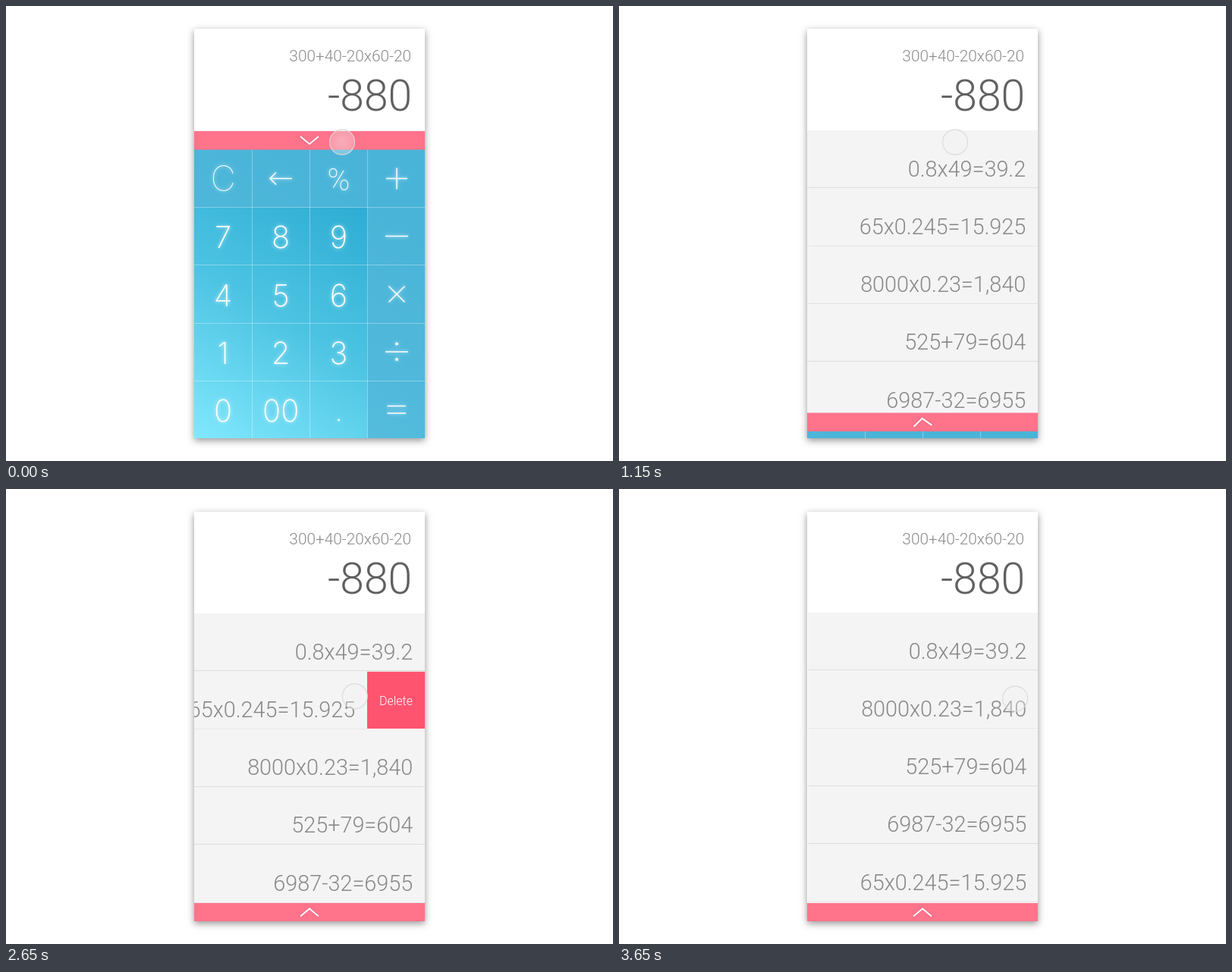
Animation of 800 by 600 pixels, one loop 4150 ms. Source, as an HTML page with a canvas:

```html
<!DOCTYPE html>
<html>
<head>
<meta charset="utf-8">
<style>
html, body { margin: 0; width: 100%; height: 100%; overflow: hidden; background: #fff; }
canvas { display: block; }
</style>
</head>
<body>
<canvas id="stage" width="800" height="600"></canvas>
<script>
const ctx = document.getElementById('stage').getContext('2d');
const LOOP = 4150, STEP = 50;
const LEFT = 248, TOP = 30, W = 304, H = 540, CELL = 76, ROW = 76.3, LIST_TOP = 164;
const ROWS = ['0.8x49=39.2', '65x0.245=15.925', '8000x0.23=1,840', '525+79=604', '6987-32=6955'];
const KEYS = [['7', '8', '9'], ['4', '5', '6'], ['1', '2', '3'], ['0', '00', '']];

const progress = (t, start, duration) => Math.min(1, Math.max(0, (t - start) / duration));
const smooth = u => u * u * (3 - 2 * u);
const mix = (a, b, p) => a + (b - a) * p;

// cubic-bezier(.25, 0, .2, 1)
function ease(u) {
  let lo = 0, hi = 1;
  for (let i = 0; i < 24; i++) {
    const s = (lo + hi) / 2, r = 1 - s;
    if (.75 * r * r * s + .6 * r * s * s + s * s * s < u) lo = s; else hi = s;
  }
  return smooth(lo);
}

function rect(x, y, w, h, color) {
  ctx.fillStyle = color;
  ctx.fillRect(x, y, w, h);
}

function text(str, x, y, font, color, align = 'right') {
  ctx.font = font;
  ctx.fillStyle = color;
  ctx.textAlign = align;
  ctx.fillText(str, x, y);
}

function lines(...paths) {
  ctx.beginPath();
  for (const p of paths)
    for (let i = 0; i < p.length; i += 2)
      i ? ctx.lineTo(p[i], p[i + 1]) : ctx.moveTo(p[i], p[i + 1]);
  ctx.stroke();
}

function dot(x, y, r) {
  ctx.beginPath();
  ctx.arc(x, y, r, 0, 7);
  ctx.fill();
}

function glow(color, blur) {
  ctx.shadowColor = color;
  ctx.shadowBlur = blur;
}

function drawRow(label, x, y) {
  rect(x, y, W, ROW + .5, '#f4f4f4');
  rect(x, Math.round(y + ROW - 1), W, 1, '#dedede');
  text(label, x + 288.2, y + 60.5, '300 28.8px Roboto, sans-serif', '#888');
}

function drawList(t) {
  const swipe = ease(progress(t, 1540, 1000));
  const gone = ease(progress(t, 2857, 800));
  const nudge = t >= 2857 ? 1 : 0;
  const shift = -CELL * swipe - W * gone;
  const y = LIST_TOP - nudge;

  drawRow(ROWS[1], LEFT + shift, LIST_TOP + ROW);
  rect(LEFT + W + shift, 240.3, CELL, 75.7, '#ff5470');
  text('Delete', LEFT + W + shift + 38, 285.3, '300 16px Roboto, sans-serif', '#fff', 'center');

  drawRow(ROWS[0], LEFT + nudge, y);
  [...ROWS.slice(2), ROWS[1]].forEach((label, i) =>
    drawRow(label, LEFT + nudge, y + ROW * (i + 2 - gone)));
}

function drawIcons() {
  ctx.strokeStyle = '#fff';
  ctx.lineWidth = 1.5;
  lines([377, 227.5, 348, 227.5], [356, 219.5, 348, 227.5, 356, 235.5]);
  lines([501, 227.5, 529, 227.5], [515, 213.5, 515, 241.5]);
  lines([500, 303.5, 530, 303.5]);
  lines([504.5, 369.5, 525.5, 390.5], [525.5, 369.5, 504.5, 390.5]);
  lines([500, 456, 530, 456]);
  lines([502.5, 527.5, 527, 527.5], [502.5, 537, 527, 537]);
  ctx.fillStyle = '#fff';
  dot(515, 445.5, 1.9);
  dot(515, 466, 1.9);
  dot(438.5, 546, 1.4);
}

function drawKeypad(p) {
  ctx.save();
  ctx.translate(0, 381 * p);

  const shade = ctx.createLinearGradient(LEFT, 570, 450, 230);
  shade.addColorStop(0, '#80e8fd');
  shade.addColorStop(.5, '#4cc3e2');
  shade.addColorStop(1, '#2baad2');
  rect(LEFT, 189, W, 381, shade);
  const veil = 'rgba(82,183,218,.8)';
  rect(LEFT, 189, W, 76.5, veil);
  rect(476.5, 265.5, 75.5, 304.5, veil);
  for (let i = 1; i < 4; i++) rect(LEFT + CELL * i, 189, 1, 381, 'rgba(255,255,255,.33)');
  for (let i = 1; i < 5; i++) rect(LEFT, Math.round(189 + 76.2 * i), W, 1, 'rgba(255,255,255,.33)');

  glow('rgba(255,255,255,.75)', 5);
  text('C', 286, 244, '100 46px Inter, sans-serif', '#fff', 'center');
  text('%', 438.5, 243, '100 40px Roboto, sans-serif', '#fff', 'center');
  KEYS.forEach((row, r) => row.forEach((key, c) =>
    text(key, 286 + 76.2 * c, 319.3 + 76.2 * r, '150 40px Inter, sans-serif', '#fff', 'center')));
  drawIcons();
  glow('transparent', 0);

  rect(LEFT, 165, W, 24.5, '#ff738b');
  ctx.translate(400, 177.2);
  ctx.rotate(Math.PI * p);
  ctx.lineWidth = 2;
  glow('rgba(130,60,80,.35)', 2);
  lines([-12, -5.2, 0, 4.8, 12, -5.2]);
  ctx.restore();
}

function drawTouch(t) {
  const drop = smooth(progress(t, 1200, 350));
  const swipe = smooth(progress(t, 1560, 590));
  const back = smooth(progress(t, 2300, 550));
  const x = mix(mix(mix(443, 440, drop), 315, swipe), 522, back);
  const y = mix(mix(mix(179.5, 258, drop), 266, swipe), 276.5, back);
  const fill = ctx.createRadialGradient(x, y, 0, x, y, 16.5);
  fill.addColorStop(0, 'rgba(240,240,240,.45)');
  fill.addColorStop(1, 'rgba(243,243,243,.3)');
  ctx.fillStyle = fill;
  dot(x, y, 16.5);
  ctx.strokeStyle = 'rgba(218,218,218,.85)';
  ctx.lineWidth = 1.3;
  ctx.stroke();
}

function draw(t) {
  rect(0, 0, 800, 600, '#fff');
  ctx.save();
  glow('rgba(0,0,0,.42)', 9);
  ctx.shadowOffsetY = 3;
  rect(LEFT, TOP, W, H, '#fff');
  ctx.restore();

  ctx.save();
  ctx.beginPath();
  ctx.rect(LEFT, TOP, W, H);
  ctx.clip();
  drawList(t);
  drawKeypad(ease(progress(t, 450, 880)));
  ctx.restore();

  text('300+40-20x60-20', 534, 73, '300 20.8px Roboto, sans-serif', '#8a8a8a');
  text('-880', 535.2, 138, '300 57px Roboto, sans-serif', '#606060');
  drawTouch(t);
}

function tick() {
  draw(Math.floor(performance.now() % LOOP / STEP) * STEP);
  requestAnimationFrame(tick);
}
tick();
</script>
</body>
</html>
```
